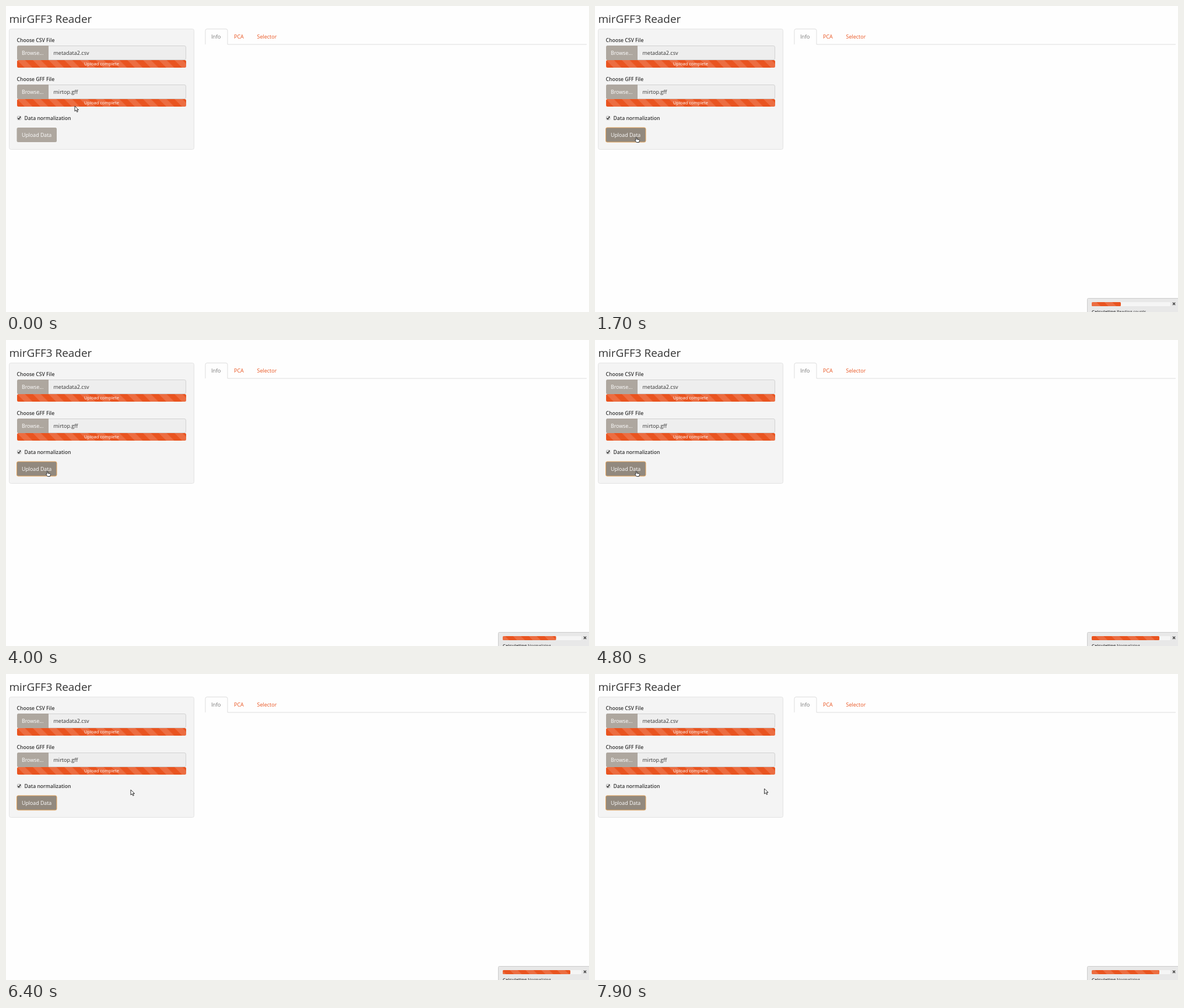
These frames come from a looping animation (1000x526 px, 8000 ms). An HTML page:

```html
<!DOCTYPE html>
<html lang="en">
<head>
<meta charset="utf-8">
<title>mirGFF3 Reader</title>
<style>
html, body { margin: 0; width: 100%; height: 100%; overflow: hidden; background: #fefefe; }
svg { display: block; width: 100%; height: 100%; font: 9px "Open Sans", "Noto Sans", sans-serif; }
text { fill: #333; }
.title { font-size: 18.9px; }
.label { font-size: 8.6px; font-weight: 600; }
.status { font-size: 7.5px; fill: #fff; text-anchor: middle; }
.button { font-size: 8.8px; fill: #fff; }
.link { fill: #e95420; }
.panel { fill: #f4f4f4; stroke: #e3e3e3; }
.input { fill: #eee; stroke: #d2d2d2; }
.grey { fill: #aea79f; }
.line { fill: none; stroke: #ddd; }
.cursor { fill: #fff; stroke: #333; stroke-linejoin: round; }
</style>
</head>
<body>
<svg viewBox="0 0 1000 526">
  <defs>
    <pattern id="stripes" width="27" height="27" patternUnits="userSpaceOnUse" patternTransform="translate(19 93) skewX(45)">
      <rect width="27" height="27" fill="#e95420"/>
      <rect width="13.5" height="27" fill="#ec6d41"/>
    </pattern>
    <pattern id="movingStripes" href="#stripes"/>
    <g id="upload">
      <rect class="input" x="19.5" y="68.5" width="289" height="24" rx="2.5"/>
      <path class="grey" d="M73 68H21.5Q19 68 19 70.5V90.5Q19 93 21.5 93H73Z"/>
      <text class="button" x="27" y="84">Browse...</text>
      <rect x="19" y="93" width="290" height="13" rx="2.5" fill="url(#stripes)"/>
      <text class="status" x="164" y="102.3">Upload complete</text>
    </g>
  </defs>

  <text class="title" x="5.5" y="29">mirGFF3 Reader</text>
  <rect class="panel" x="5.5" y="39.5" width="317" height="207" rx="3"/>
  <text class="label" x="18.5" y="61.7">Choose CSV File</text>
  <use href="#upload"/>
  <text x="81.5" y="84">metadata2.csv</text>
  <text class="label" x="18.5" y="128.7">Choose GFF File</text>
  <use href="#upload" y="67"/>
  <text x="81.5" y="151">mirtop.gff</text>

  <rect x="19.5" y="189.5" width="6" height="6" rx="1" fill="#f4f4f4" stroke="#aaa"/>
  <path d="M20.5 192.5l1.5 2 3-4.5" fill="none" stroke="#333" stroke-width="1.4"/>
  <text class="label" x="31.5" y="195.8">Data normalization</text>
  <rect id="button" x="18.5" y="209" width="68.5" height="25" rx="2.5"/>
  <text class="button" x="27" y="225">Upload Data</text>

  <path class="line" d="M342 66V42.5Q342 39.5 345 39.5H377Q380 39.5 380 42.5V66H996"/>
  <text x="352" y="56" style="fill:#777">Info</text>
  <text class="link" x="391" y="56">PCA</text>
  <text class="link" x="430.5" y="56">Selector</text>

  <g id="notice">
    <rect x="844.5" y="502.5" width="160" height="40" rx="2" fill="#e8e8e8" stroke="#ccc"/>
    <rect x="852" y="509" width="135" height="7" rx="1.5" fill="#f5f5f5"/>
    <rect id="bar" x="852" y="509" height="7" rx="1.5" fill="url(#movingStripes)"/>
    <path d="M991 509.7l4.2 4.2m0-4.2l-4.2 4.2" stroke="#444" stroke-width="1.4"/>
    <text x="852" y="528" font-size="7.7" font-weight="600">Calculating</text>
    <text id="detail" x="895" y="528" font-size="7"></text>
  </g>

  <path id="arrow" class="cursor" d="M0 0V9L2.2 7L3.800 10.3L5.3 9.6L3.8 6.5H6.5Z"/>
  <path id="hand" class="cursor" d="M-.5 0Q.5-1 1.3 0V3L5 3.7Q6 4 5.8 5.5L5 8.5H.8L-1.8 5.2Q-1.8 4-.5 4.8Z"/>
</svg>
<script>
const LOOP = 8000, STEP = 100;
const CLICK = 800, NOTICE = 1300, NORMALIZE = 3790;
// time, x, y
const path = [
  [0, 118, 172], [100, 118, 172], [700, 70.5, 226], [5200, 70.5, 226],
  [5600, 115, 224], [6400, 214, 199], [7400, 290.5, 197], [LOOP, 290.5, 197]
];
const [button, notice, bar, detail, arrow, hand, stripes] =
  ["button", "notice", "bar", "detail", "arrow", "hand", "movingStripes"].map(id => document.getElementById(id));

const set = (el, attrs) => Object.entries(attrs).forEach(([name, value]) => el.setAttribute(name, value));
const show = (el, on) => set(el, { visibility: on ? "visible" : "hidden" });
const clamp = v => Math.min(1, Math.max(0, v));

// CSS "ease": cubic-bezier(.25, .1, .25, 1)
function ease(x) {
  x = clamp(x);
  const bezier = (a, b, s) => 3 * a * s * (1 - s) ** 2 + 3 * b * s * s * (1 - s) + s ** 3;
  let low = 0, high = 1;
  for (let i = 0; i < 20; i++) {
    const mid = (low + high) / 2;
    if (bezier(.25, .25, mid) < x) low = mid; else high = mid;
  }
  return bezier(.1, 1, low);
}

function cursorAt(t) {
  const i = path.findIndex(p => p[0] > t);
  const [t0, x0, y0] = path[i - 1], [t1, x1, y1] = path[i];
  const k = (t - t0) / (t1 - t0);
  return [x0 + (x1 - x0) * k, y0 + (y1 - y0) * k];
}

function draw(t) {
  const [x, y] = cursorAt(t);
  const hover = x >= 18 && x <= 87 && y >= 209 && y <= 234;
  show(arrow, !hover);
  show(hand, hover);
  set(hover ? hand : arrow, { transform: `translate(${x} ${y})` });

  const focused = t >= CLICK;
  set(button, {
    fill: hover || focused ? "#92897e" : "#aea79f",
    stroke: focused ? "#e8a860" : "none"
  });

  show(notice, t >= NOTICE);
  set(notice, { opacity: clamp((t - NOTICE) / 250) });
  set(bar, { width: 54 * ease((t - NOTICE) / 600) + 62 * ease((t - NORMALIZE) / 600) });
  detail.textContent = t < NORMALIZE ? "Reading counts" : "Normalizing";
  set(stripes, { patternTransform: `translate(${852 - 27 * (t - NOTICE) / 2000} 509) skewX(45)` });
}

const start = performance.now();
function tick() {
  const t = (performance.now() - start) % LOOP;
  draw(Math.floor(t / STEP) * STEP);
  requestAnimationFrame(tick);
}
tick();
</script>
</body>
</html>
```
